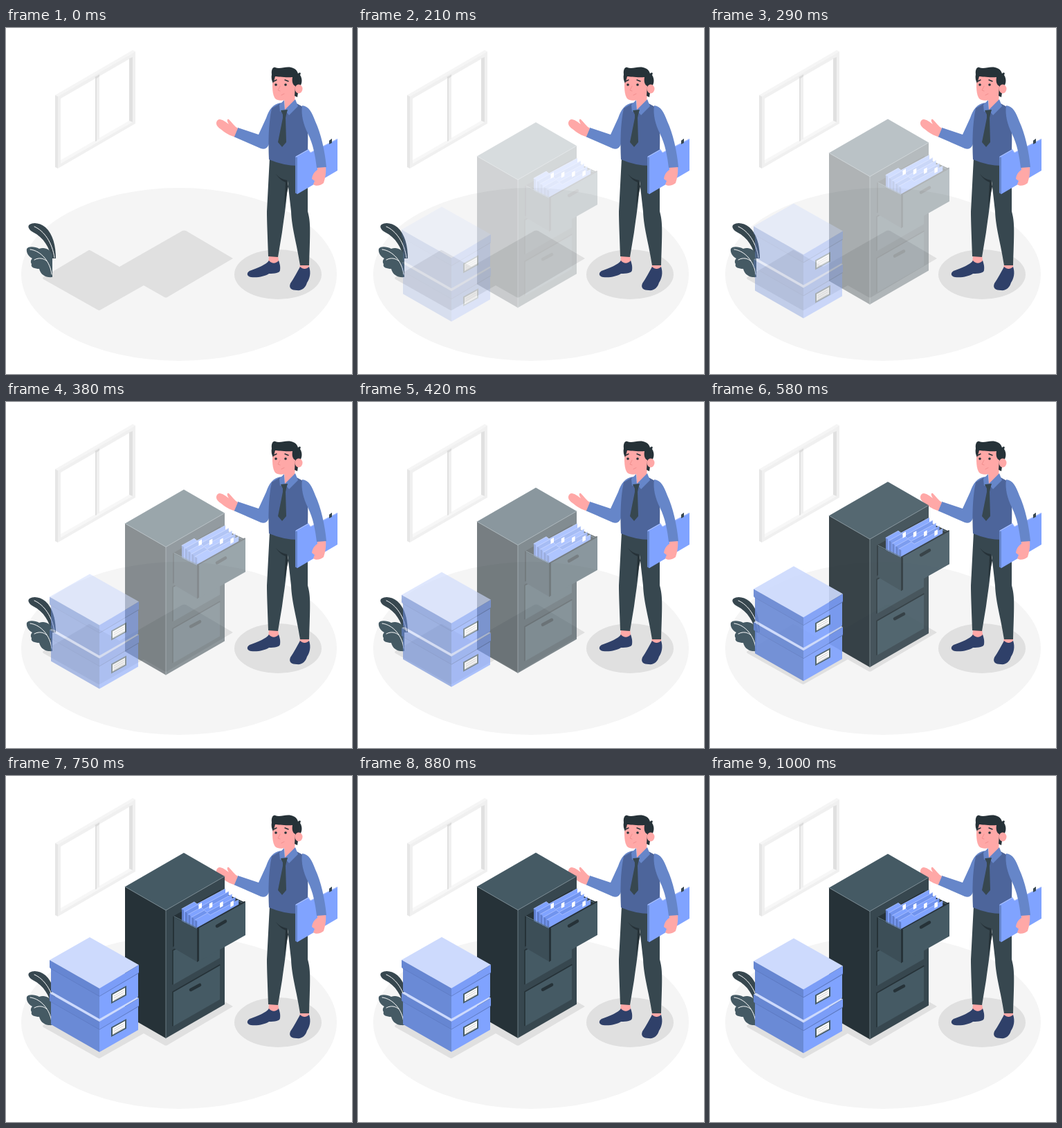
These frames come from a looping animation (500x500 px, 1.04 s). An HTML page:

```html
<!DOCTYPE html>
<html lang="en">
<head>
<meta charset="utf-8">
<title>Office archive</title>
<style>
html, body { margin: 0; width: 100%; height: 100%; overflow: hidden; background: #fff; }
svg { display: block; width: 100vw; height: 100vh; }
.line { fill: none; stroke-linecap: round; stroke-linejoin: round; }
</style>
</head>
<body>
<svg viewBox="0 0 500 500">
  <ellipse cx="250" cy="356" rx="228" ry="125" fill="#f5f5f5"/>

  <g id="shadows" fill="#e0e0e0">
    <ellipse cx="393" cy="356" rx="63" ry="36"/>
    <path d="M54 360L118 322Q120 320 123 322L164 345L255 293Q257 292 260 293L328 333L233 389Q231 390 229 389L199 372L137 407Q135 409 132 407L54 363Q52 361 54 360Z"/>
  </g>

  <g id="window">
    <path d="M71 97L183 32L187 34L75 99Z" fill="#f5f5f5"/>
    <path d="M71 97L75 99V203L71 201Z" fill="#e6e6e6"/>
    <path d="M75 99L187 34V138L75 203Z" fill="#f0f0f0"/>
    <path d="M79 102L183 42V136L79 196Z" fill="#f7f7f7"/>
    <path d="M178 44L183 42V136L178 134Z" fill="#e0e0e0"/>
    <path d="M79 102L178 45V134L79 191Z" fill="#fff"/>
    <path d="M129 71L135 68V160L129 164Z" fill="#f0f0f0"/>
    <path d="M129 71L131 72V163L129 164Z" fill="#e0e0e0"/>
    <path d="M128 71L135 67V70L131 73Z" fill="#dcdcdc"/>
  </g>

  <g id="plant">
    <path d="M34 284C40 280 50 282 57 288C68 298 72 315 72 333L66 333C63 318 55 303 39 295C32 291 31 286 34 284Z" fill="#37474f"/>
    <path d="M30 319C33 315 42 316 48 319C55 316 64 319 67 328L67 360C58 361 50 357 48 348C42 348 35 346 37 341C35 338 36 335 38 333C32 330 29 324 30 319Z" fill="#455a64"/>
    <path class="line" d="M41 287C55 293 67 310 70 332M35 320C51 322 64 338 66 356M41 335C48 331 55 333 59 337" stroke="#fff"/>
  </g>

  <g id="man">
    <path d="M380 329H393L395 342L386 345L379 340ZM425 341H438V349L431 353L424 348Z" fill="#ffa8a7"/>
    <path d="M380 336C376 342 365 346 352 351C347 354 348 359 354 360C364 361 374 359 380 355C388 355 396 354 396 350C397 344 395 339 394 336C390 341 384 341 380 336ZM425 345C421 352 416 362 411 369C408 376 413 379 420 379C428 380 433 375 435 368C439 362 441 354 438 345C434 349 429 349 425 345Z" fill="#2f4069"/>
    <path d="M381 188L410 196L436 194V265C440 280 440 288 438 343L425 343C420 310 413 290 412 265L407 221C406 250 402 272 399 295L393 331L379 330C378 300 377 280 377 265Z" fill="#37474f"/>
    <path d="M390 211Q397 219 406 220L408 229L402 258L404 223Q396 220 390 211Z" fill="#263238"/>

    <path d="M398 108C386 109 380 118 376 130L365 154L335 144L329 157L368 174C373 176 377 174 379 170L386 155Z" fill="#6686c9"/>
    <path d="M335 145C330 142 327 137 322 132C319 131 319 135 322 139C316 135 310 130 306 133C302 137 304 142 310 146C316 151 324 156 330 157Z" fill="#ffa8a7"/>
    <path d="M384 116L396 109L403 119L420 109L431 115C436 126 437 150 436 180V198Q408 202 380 190C379 165 379 140 384 116Z" fill="#4d659b"/>
    <path d="M402 98L418 94L417 107L403 119Z" fill="#ffa8a7"/>
    <path d="M402 104L395 111L396 121L403 119L409 126L422 113L418 103L403 118Z" fill="#6686c9"/>
    <path d="M397 119L407 118L405 125L404 130L405 165L399 172L393 165L400 130V125Z" fill="#37474f"/>

    <path d="M386 71C384 84 385 97 389 102C393 106 403 105 409 102L418 94L421 70L404 63Z" fill="#ffa8a7"/>
    <path d="M384 67C383 60 386 56 389 57C396 60 404 55 412 57C417 58 421 61 422 66C425 63 427 65 425 68C429 74 428 82 423 87L421 100L417 98L418 84C414 82 413 77 414 71C404 72 393 70 389 70C388 74 387 77 386 80C384 76 383 72 384 67Z" fill="#263238"/>
    <ellipse cx="423" cy="88" rx="5.5" ry="6.5" fill="#ffa8a7"/>
    <g fill="#263238"><circle cx="390" cy="82" r="1.8"/><circle cx="404" cy="82" r="1.8"/></g>
    <path class="line" d="M387 77L391 75M403 75L408 77" stroke="#263238" stroke-width="1.4"/>
    <path class="line" d="M396 84L393 90L396 91M398 97L402 95" stroke="#f28f8f"/>

    <path d="M467 163L471 160V170H467Z" fill="#37474f"/>
    <path d="M418 186L437 175L440 180L479 160V206L421 240L418 238Z" fill="#80a3ff"/>
    <path d="M418 186L421 187V240L418 238Z" fill="#6686cc"/>
    <path class="line" d="M419 186L437 176L440 180L478 161" stroke="#b2c7ff"/>
    <path d="M467 163L471 160V166L467 168Z" fill="#37474f"/>
    <path d="M450 200L462 200C463 209 461 218 459 224C455 228 447 229 444 226L446 221L442 218Q443 209 450 205Z" fill="#ffa8a7"/>
    <path d="M428 112C438 113 442 122 447 135C455 152 461 178 463 201L449 202C447 185 444 168 436 152C430 140 426 125 428 112Z" fill="#6686c9"/>
  </g>

  <g id="cabinet" class="rise">
    <path d="M172 162L257 113L316 147L231 196Z" fill="#455a64"/>
    <path d="M172 162L231 196V381L172 347Z" fill="#263238"/>
    <path d="M231 196L316 147V332L231 381Z" fill="#37474f"/>
    <path class="line" d="M172 162L231 196L316 147M231 196V381" stroke="#7b8d96" stroke-width=".8"/>
    <path d="M241 205L310 166V210L241 249Z" fill="#263238"/>
    <g id="closed"></g>
    <path d="M243 207L311 169L346 185L277 223Z" fill="#263238"/>
    <path class="line" d="M309 172L344 186" stroke="#607680"/>
    <g id="files"></g>
    <path d="M243 206L277 223V271L243 251Z" fill="#3c4e57"/>
    <path class="line" d="M277 222L243 205" stroke="#607680"/>
    <path d="M277 223L344 185Q346 184 346 186V232L277 271Z" fill="#455a64"/>
    <path d="M276 222L279 222V269L276 271Z" fill="#263238"/>
    <path class="line" d="M277 222L345 184" stroke="#263238" stroke-width="2"/>
    <path class="line" d="M305 219L317 212" stroke="#263238" stroke-width="4.5"/>
  </g>

  <g id="boxes" class="rise"></g>
</svg>
<script>
const get = id => document.getElementById(id);
const shape = (d, fill) => `<path d="${d}" fill="${fill}"/>`;
const line = (d, color, width) => `<path class="line" d="${d}" stroke="${color}" stroke-width="${width}"/>`;

const closedDrawer = y =>
  shape(`M241 ${y}l68 -39v50l-68 39z`, '#455a64') +
  line(`M309 ${y - 39}L241 ${y}v49`, '#263238', 1.6) +
  line(`M267 ${y - 3}l13 -7`, '#263238', 4.5);
get('closed').innerHTML = closedDrawer(254) + closedDrawer(314);

let files = '', tabs = '';
for (let i = 0; i < 5; i++) {
  const x = 254 + i * 4.8, y = 194 + i * 4;
  files += shape(`M${x} ${y}l18 -10l4 3l41 -22v27l-63 37z`, i % 2 ? '#7194ee' : '#80a3ff') +
    shape(`M${x} ${y}l3 2v34l-3 -3z`, '#5f7dcb') +
    line(`M${x} ${y}l18 -10l4 3l41 -22`, '#a9bfff', .9);
  if (i < 4) tabs += shape(`M${278.5 + i * 15.3} ${187.5 - i}l4.5 -2.5v7l-4.5 2.5z`, '#fff');
}
get('files').innerHTML = files + tabs;

// y is the left corner of the lid
const box = y =>
  shape(`M65 ${y + 9}L135 ${y + 49}V${y + 85}L65 ${y + 45}z`, '#6a8ad6') +
  shape(`M135 ${y + 49}L191 ${y + 16}V${y + 53}L135 ${y + 85}z`, '#80a3ff') +
  line(`M65 ${y + 12}L135 ${y + 52}L191 ${y + 19}`, '#5c78bf', 1.5) +
  shape(`M63 ${y}l58 -33l71 40l-57 34z`, '#cddafd') +
  shape(`M63 ${y}l72 41v11l-72 -41z`, '#6686d2') +
  shape(`M135 ${y + 41}l57 -34v11l-57 34z`, '#7b9df7') +
  shape(`M152 ${y + 49}l22 -12v14l-22 12z`, '#455a64') +
  shape(`M154 ${y + 50}l18 -10v10l-18 10z`, '#fff') +
  [53, 56, 59].map(d => line(`M156 ${y + d - 1}l14 -8`, '#bdbdbd', .8)).join('');
get('boxes').innerHTML = box(316) + box(268);

const bezier = (s, a, b) => 3 * (1 - s) ** 2 * s * a + 3 * (1 - s) * s * s * b + s ** 3;

// Ease with overshoot: cubic-bezier(.36, -.01, .5, 1.38)
function ease(x) {
  let low = 0, high = 1;
  for (let i = 0; i < 30; i++) {
    const mid = (low + high) / 2;
    if (bezier(mid, .36, .5) < x) low = mid; else high = mid;
  }
  return bezier(high, -.01, 1.38);
}

const LOOP = 1040, FPS = 24, RISE = 30, REST = -.5;
const movers = document.querySelectorAll('.rise');

function draw(now) {
  const step = Math.min(24, Math.floor((now % LOOP + 5) * FPS / 1000));
  const e = step < 2 ? 0 : ease((step + 1) / 25);
  for (const m of movers) {
    m.setAttribute('transform', `translate(0 ${REST + RISE * (1 - e)})`);
    m.setAttribute('opacity', Math.min(1, e));
  }
}

const start = performance.now();
function tick() {
  draw(performance.now() - start);
  requestAnimationFrame(tick);
}
tick();
</script>
</body>
</html>
```
